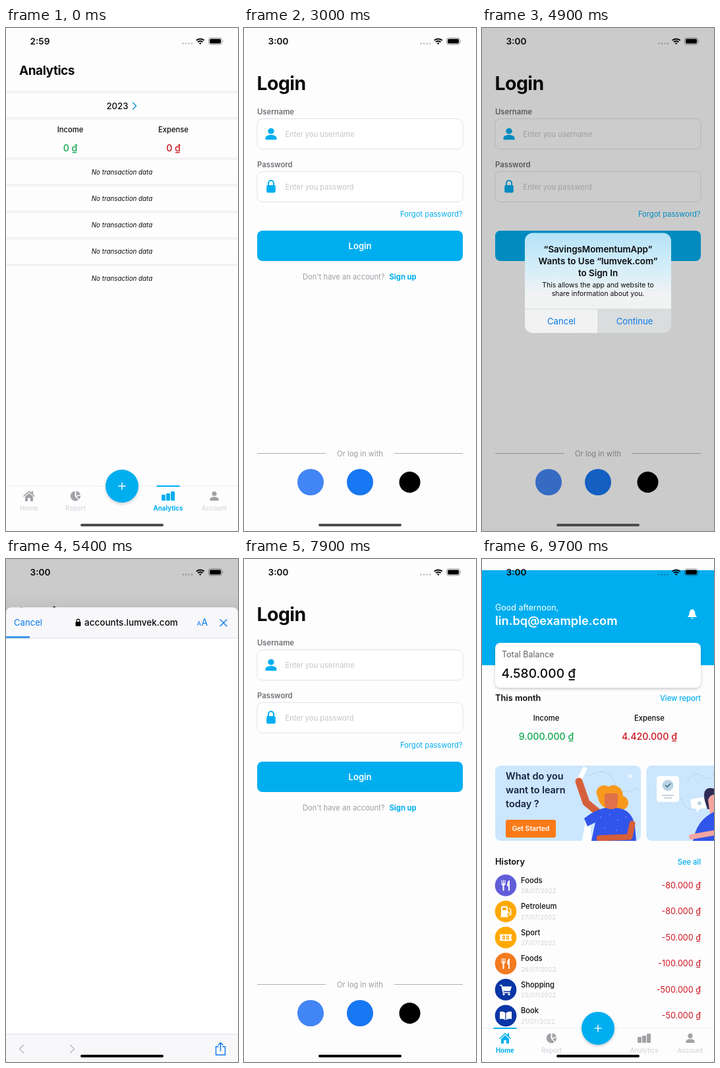
Animation, 352 px wide and 762 px high, one loop 9.8 s. Source, as an HTML page:

```html
<!DOCTYPE html>
<html lang="en">
<head>
<meta charset="utf-8">
<title>Money app login flow</title>
<style>
  :root {
    --blue: #00aeef;
    --loop: 9800ms;
    /* critically damped spring sampled over 520 ms */
    --spring: linear(0, .0525 3.85%, .166 7.7%, .429 15.4%, .643, .789, .879, .933, .963, .98, .989, .9944, .997, 1);
  }
  html, body { margin: 0; width: 100%; height: 100%; overflow: hidden; background: #fefdfe; }
  svg { display: block; width: 100vw; height: 100vh; }
  text { font-family: Inter, "Noto Sans", sans-serif; font-size: 11.2px; fill: #0b0b0d; white-space: pre; }
  .mid { text-anchor: middle; }
  .end { text-anchor: end; }
  .b { font-weight: 700; }
  .sb { font-weight: 600; }
  .m { font-weight: 500; }
  .blue { fill: var(--blue); }
  .ios { fill: #0a7aea; font-size: 13.1px; }
  .white { fill: #fff; }
  .green { fill: #12a84e; }
  .red { fill: #cb1620; }
  .grey { fill: #9d9da4; }
  .label { fill: #6f6f75; font-weight: 600; font-size: 11.3px; }
  .hint { fill: #c5c5cb; font-size: 11.1px; }
  .h1 { font-size: 19px; font-weight: 700; letter-spacing: -.45px; }
  .h2 { font-size: 12.8px; font-weight: 600; }
  .ask { font-size: 13.4px; font-weight: 600; text-anchor: middle; }
  .note { font-size: 10.4px; text-anchor: middle; }
  .sum { font-size: 14.2px; font-weight: 500; }
  .tab { font-size: 9.7px; font-weight: 500; text-anchor: middle; fill: #d5d5dc; }
  .tab.on { font-weight: 700; fill: var(--blue); }
  .none { font-size: 9.8px; font-style: italic; text-anchor: middle; }
  .date { font-size: 9.6px; fill: #d2d2d9; }
  .slogan { font-size: 14.4px; font-weight: 600; fill: #17213c; }
  .line { fill: none; stroke-linecap: round; stroke-linejoin: round; }
  .page text { font-family: Roboto, "Noto Sans", sans-serif; fill: #3c4043; font-size: 11.7px; }
  .page .foot { font-size: 9.7px; }

  .anim { animation: var(--loop) linear infinite; }
  .step { animation-timing-function: step-end; }
  .old { animation-name: old; }
  .new { animation-name: new; }
  .account { animation-name: account; }
  .login { animation-name: login; }
  .dim { animation-name: dim; }
  .alert { animation-name: alert; transform-origin: 176px 386px; }
  .press { animation-name: press; }
  .sheet { animation-name: sheet; }
  .load { animation-name: load; transform-origin: 0 0; }
  .page { animation-name: page; }
  .tap { animation-name: tap; }
  .busy { animation-name: busy; }
  .seek { animation-name: seek; }
  .stop { animation-name: stop; }
  .reload { animation-name: reload; }
  .back { animation-name: back; }
  .home { animation-name: home; }
  .bar { animation-name: bar; }

  @keyframes old { 0% { opacity: 1 } 30.56%, 100% { opacity: 0 } }
  @keyframes new { 0% { opacity: 0 } 30.56%, 100% { opacity: 1 } }
  @keyframes account { 0% { opacity: 0 } 10.15%, 100% { opacity: 1 } }
  @keyframes login {
    0% { transform: translateY(762px) }
    22.28% { transform: translateY(762px); animation-timing-function: var(--spring) }
    27.58%, 100% { transform: none }
  }
  @keyframes dim { 0%, 39.59% { opacity: 0 } 42.35%, 75.92% { opacity: .2 } 80%, 100% { opacity: 0 } }
  @keyframes alert {
    0% { opacity: 0; transform: scale(1.18) }
    39.59% { opacity: 0; transform: scale(1.18); animation-timing-function: var(--spring) }
    44.9%, 50.51% { opacity: 1; transform: none }
    51.84%, 100% { opacity: 0; transform: none }
  }
  @keyframes press { 0% { opacity: 0 } 49.9%, 100% { opacity: 1 } }
  @keyframes sheet {
    0% { transform: translateY(735px) }
    51.07% { transform: translateY(735px); animation-timing-function: var(--spring) }
    56.38% { transform: none }
    75.92% { transform: none; animation-timing-function: var(--spring) }
    81.22%, 100% { transform: translateY(735px) }
  }
  @keyframes load {
    0%, 60.1% { transform: scaleX(.102); opacity: 1 }
    65.31% { transform: none; opacity: 1 }
    66.12%, 72.34% { transform: none; opacity: 0 }
    72.35%, 100% { transform: scaleX(.102); opacity: 1 }
  }
  @keyframes page {
    0%, 63.15% { opacity: 0 }
    63.16%, 71.43% { opacity: 1 }
    72.96%, 100% { opacity: .5 }
  }
  @keyframes tap { 0% { opacity: 0 } 70.31% { opacity: 1 } 72%, 100% { opacity: 0 } }
  @keyframes busy { 0% { opacity: 0 } 71.33%, 100% { opacity: 1 } }
  @keyframes seek {
    0%, 71.33% { transform: translateX(-214px) }
    75.51% { transform: translateX(37px) }
    81.22%, 100% { transform: translateX(352px) }
  }
  @keyframes stop { 0% { opacity: 1 } 65.2% { opacity: 0 } 72.35%, 100% { opacity: 1 } }
  @keyframes reload { 0% { opacity: 0 } 65.2% { opacity: 1 } 72.35%, 100% { opacity: 0 } }
  @keyframes back { 0% { stroke: #b9b9be } 72.35%, 100% { stroke: #0a7aea } }
  @keyframes home {
    0% { transform: translateY(762px) }
    94.72% { transform: translateY(762px); animation-timing-function: var(--spring) }
    100% { transform: none }
  }
  @keyframes bar { 0% { fill: #4c4c4f } 52%, 100% { fill: #000 } }
</style>
</head>
<body>
<svg viewBox="0 0 352 762">
  <defs>
    <linearGradient id="frost" x2="0" y2="1">
      <stop offset="0" stop-color="#b5e2f7"/><stop offset=".3" stop-color="#cfecf9"/>
      <stop offset=".62" stop-color="#f1f3f4"/><stop offset="1" stop-color="#f1f1f1"/>
    </linearGradient>
    <linearGradient id="shade" x2="0" y2="1">
      <stop offset="0" stop-opacity="0"/><stop offset="1" stop-opacity=".09"/>
    </linearGradient>
    <filter id="soft" x="-20%" y="-20%" width="140%" height="150%">
      <feDropShadow dx="0" dy="2" stdDeviation="2" flood-opacity=".2"/>
    </filter>
    <clipPath id="alertBox"><rect x="65" y="310.5" width="222" height="151.5" rx="12"/></clipPath>
    <clipPath id="card1"><rect x="20" y="296" width="221" height="114" rx="8"/></clipPath>
    <clipPath id="card2"><rect x="249.5" y="296" width="221" height="114" rx="8"/></clipPath>

    <path id="houseIcon" d="M-9 0 0-8 3.5-5V-7.5H6V-2.7L9 0 8 1.2 0-5.8-8 1.2zM-6 1 0-4.3 6 1V8H2V3H-2V8H-6z"/>
    <path id="pieIcon" d="M-1-7.5A7.5 7.5 0 1 0 4.5 5.8L-1 .5zM1-7.5A7.5 7.5 0 0 1 7.3-2.5L1-.5zM1.5 1 7.5-1A7.5 7.5 0 0 1 5.8 5z"/>
    <g id="barsIcon"><rect x="-10" y="-2" width="6" height="9" rx="1.3"/><rect x="-3" y="-4" width="6" height="11" rx="1.3"/><rect x="4" y="-7" width="6" height="14" rx="1.3"/></g>
    <g id="personIcon"><circle cy="-3.5" r="3.6"/><path d="M-6.5 7V5C-6.5 0 6.5 0 6.5 5V7z"/></g>

    <path id="forkIcon" d="M-6.5-8V-3Q-6.5 0-4.5 0V8H-2.5V0Q-.5 0-.5-3V-8H-1.6V-3H-2.9V-8H-4.1V-3H-5.4V-8zM6-8Q2-7 2 1H4V8H6z"/>
    <path id="pumpIcon" fill-rule="evenodd" d="M-7-6Q-7-8-5-8H1Q3-8 3-6V0Q6 0 6 3V4Q7 5 7 3V-2L4.5-4.5 5.5-5.5 8.5-2.5V4Q8 7 5 5.5V3Q5 1.5 3 1.5V7H4V8.5H-8V7H-7zM-5-6V-2H1V-6z"/>
    <path id="ticketIcon" fill-rule="evenodd" d="M-9-5H9V-1.5Q7 0 9 1.5V5H-9V1.5Q-7 0-9-1.5zM-5-3V3H-1V-3zM1-3V3H5V-3zM-4-1H-2V1H-4zM2-1H4V1H2z"/>
    <g id="cartIcon"><path d="M-9-7.5H-5.5L-5-5H9L7 2H-3.6L-3.3 3.5H6.5V5H-4.6L-6.8-6H-9z"/><circle cx="-3" cy="7" r="1.6"/><circle cx="5" cy="7" r="1.6"/></g>
    <path id="bookIcon" d="M-.6-4.5Q-4-7-9-6V5Q-4 4-.6 6.5zM.6-4.5Q4-7 9-6V5Q4 4 .6 6.5z"/>
    <g id="lockIcon"><rect x="-6.8" y="-2" width="13.6" height="11.5" rx="2"/><path class="line" stroke="currentColor" stroke-width="2" d="M-4-2V-5A4 4 0 0 1 4-5V-2"/></g>
  </defs>

  <g id="analytics">
    <rect width="352" height="762" fill="#fefdfe"/>
    <text class="h1" x="20" y="71">Analytics</text>
    <g id="bands" fill="#f3f3f6"></g>
    <text class="mid m" x="169" y="122.7" style="font-size:13.2px">2023</text>
    <path class="line" d="M192.5 113 197.5 118 192.5 123" stroke="#1597d4" stroke-width="1.5"/>
    <path d="M176 143V195" stroke="#f6f6f8"/>
    <g id="totals"></g>
  </g>

  <g class="anim step account">
    <rect width="352" height="762" fill="#fefdfe"/>
    <text class="h1" x="20" y="71">Account</text>
    <rect y="95" width="352" height="4" fill="#f3f3f6"/>
    <g id="accountTabs"></g>
  </g>

  <g class="anim login">
    <rect width="352" height="762" fill="#fefdfe"/>
    <text class="b" x="19.5" y="94" style="font-size:28.5px;letter-spacing:-.6px">Login</text>
    <text class="label" x="20" y="131">Username</text>
    <text class="label" x="20" y="211">Password</text>
    <g fill="#fff" stroke="#e1e0e8"><rect x="20" y="137.5" width="312" height="46" rx="8"/><rect x="20" y="217.5" width="312" height="46" rx="8"/></g>
    <use href="#personIcon" class="blue" transform="translate(41 160.5) scale(1.3 1.25)"/>
    <use href="#lockIcon" class="blue" color="#00aeef" x="41" y="240"/>
    <text class="hint" x="62.5" y="164.5">Enter you username</text>
    <text class="hint" x="62.5" y="244.5">Enter you password</text>
    <text class="blue end" x="331.5" y="286">Forgot password?</text>
    <rect class="blue" x="20" y="307" width="312" height="46" rx="8"/>
    <text class="white sb mid" x="176" y="334.7" style="font-size:13px">Login</text>
    <text class="grey" x="89" y="380.5">Don't have an account?</text>
    <text class="blue b" x="220.5" y="380.5">Sign up</text>
    <path d="M20 644.5H124M228 644.5H332" stroke="#aeaeb2"/>
    <text class="grey mid" x="176" y="648.5">Or log in with</text>
    <circle cx="101" cy="688" r="20" fill="#4285f4"/>
    <circle cx="176" cy="688" r="20" fill="#1877f2"/>
    <circle cx="251.5" cy="688" r="16"/>
  </g>

  <rect class="anim dim" width="352" height="762"/>

  <g class="anim alert">
    <g clip-path="url(#alertBox)">
      <rect x="65" y="310" width="222" height="152" fill="url(#frost)"/>
      <rect class="anim step press" x="176" y="426" width="111" height="36" fill="#dadddd"/>
      <path d="M65 426H287M176 426V462" stroke="#c9cccd" stroke-width=".7"/>
    </g>
    <text class="ask" x="176" y="340">“SavingsMomentumApp”</text>
    <text class="ask" x="176" y="358">Wants to Use “lumvek.com”</text>
    <text class="ask" x="176" y="376">to Sign In</text>
    <text class="note" x="176" y="392.7">This allows the app and website to</text>
    <text class="note" x="176" y="406">share information about you.</text>
    <text class="ios mid" x="120.5" y="449">Cancel</text>
    <text class="ios mid" x="231.5" y="449">Continue</text>
  </g>

  <g class="anim sheet">
    <rect y="27" width="352" height="40" fill="url(#shade)"/>
    <path d="M0 762V56Q0 47 9 47H343Q352 47 352 56V762z" fill="#f8f7fa"/>
    <rect y="93.5" width="352" height="600" fill="#fefefe"/>
    <path d="M0 93.5H352M0 693.5H352" stroke="#dedde1"/>
    <text class="ios" x="12" y="75">Cancel</text>
    <use href="#lockIcon" color="#000" transform="translate(109.5 70) scale(.58)"/>
    <text class="m" x="119" y="75" style="font-size:13.5px">accounts.lumvek.com</text>
    <text class="ios" x="289.5" y="75" style="font-size:9.5px">A</text>
    <text class="ios" x="296.5" y="75" style="font-size:14px">A</text>
    <g class="line" stroke="#0a7aea" stroke-width="1.4">
      <path class="anim step stop" d="M325 65.5 335 75.5M335 65.5 325 75.5"/>
      <path class="anim step reload" d="M334.5 68A5.8 5.8 0 1 0 335.5 71.5M334.8 63.5V68.2H330"/>
      <path class="anim step back" d="M26.5 710 20.5 716 26.5 722"/>
      <path d="M97.5 710 103.5 716 97.5 722" stroke="#b9b9be"/>
      <path d="M322 712.5H318.5V725H332.5V712.5H329M325.5 719V706.5M322 710 325.5 706.5 329 710"/>
    </g>
    <g class="anim page">
      <circle cx="19" cy="109" r="5.5" fill="#4285f4"/>
      <text x="34.5" y="112.7">Đăng nhập bằng Lumvek</text>
      <path d="M0 122.5H352M20 260.5H332M20 301.5H332" stroke="#d5d7da"/>
      <rect class="anim step tap" x="20" y="219" width="312" height="41" fill="#ececee"/>
      <text class="mid" x="176" y="164.5" style="font-size:20px">Chọn tài khoản</text>
      <text x="60" y="191.7" style="font-size:13px">để tiếp tục tới</text>
      <text class="m" x="146" y="191.7" style="font-size:13.5px;fill:#1a73e8">SavingsMomentumApp</text>
      <circle cx="31" cy="238" r="10" fill="#3f9dc0"/>
      <text x="52.5" y="242.5" style="font-size:10.8px">lin.bq@example.com</text>
      <g class="line" stroke="#3c4043" stroke-width="1.2"><circle cx="31" cy="281" r="6.5"/><circle cx="31" cy="279" r="2.2"/><path d="M26.5 285.5Q31 281.5 35.5 285.5"/></g>
      <text class="m" x="52.5" y="285" style="font-size:12.3px">Sử dụng một tài khoản khác</text>
      <text x="20" y="348">Để tiếp tục, Lumvek sẽ chia sẻ tên, địa chỉ email, tùy chọn</text>
      <text x="20" y="365.5">ngôn ngữ và ảnh hồ sơ của bạn với</text>
      <text x="20" y="383">SavingsMomentumApp.</text>
      <text class="foot" x="20" y="648">Tiếng Việt</text>
      <path d="M70.5 643H77L73.7 646.5z" fill="#3c4043"/>
      <text class="foot" x="157" y="648">Trợ giúp</text>
      <text class="foot" x="219.5" y="648">Bảo mật</text>
      <text class="foot end" x="332" y="648">Điều khoản</text>
    </g>
    <g class="anim step busy">
      <rect y="93" width="352" height="3" fill="#dcdde0"/>
      <rect class="anim seek" y="93" width="214" height="3" fill="#1a73e8"/>
    </g>
    <rect class="anim load" y="91" width="352" height="2.3" fill="#0a7aea"/>
  </g>

  <g class="anim home">
    <rect width="352" height="762" fill="#fefdfe"/>
    <rect class="blue" width="352" height="144"/>
    <text class="white" x="20" y="61" style="font-size:12.5px">Good afternoon,</text>
    <text class="white sb" x="20" y="83" style="font-size:18.2px">lin.bq@example.com</text>
    <path class="white" d="M319 59C314 60 315 66 314 68L312 71H326L324 68C323 66 324 60 319 59zM317 72H321Q319 75 317 72z"/>
    <rect x="20" y="110" width="312" height="68" rx="8" class="white" filter="url(#soft)"/>
    <text x="30" y="132.5" style="font-size:12.5px;fill:#606066">Total Balance</text>
    <text class="m" x="29.5" y="163" style="font-size:19.2px">4.580.000 ₫</text>
    <text class="h2" x="20" y="198.5">This month</text>
    <text class="blue m end" x="332" y="198.5">View report</text>
    <g id="month"></g>

    <g clip-path="url(#card1)">
      <rect x="20" y="296" width="222" height="114" fill="#cbe6fd"/>
      <path class="line" d="M160 312Q190 296 200 320T236 330" stroke="#9fb9dc" stroke-width=".7" stroke-dasharray="2 2"/>
      <path d="M152 410 158 372 164 374 166 410zM141 322 154 297 160 300 148 326z" fill="#fff"/>
      <path class="line" d="M147 320 158 352 180 370" stroke="#d65f3a" stroke-width="11"/>
      <path d="M176 344C168 332 182 322 192 328 202 322 214 330 214 342 226 346 224 362 212 363 202 368 178 362 176 344z" fill="#f7991d"/>
      <path d="M155 376Q180 356 204 360 228 362 232 388L234 410H166L172 382 160 388z" fill="#3155ea"/>
      <path d="M186 338H206V352Q206 362 196 362T186 352z" fill="#e0714a"/>
      <path d="M184 342Q192 332 208 340L208 332 186 330z" fill="#f7991d"/>
      <path class="line" d="M228 384 224 404 178 406" stroke="#d65f3a" stroke-width="9"/>
      <g fill="#6f8bfa"><circle cx="180" cy="374" r="1"/><circle cx="194" cy="370" r="1"/><circle cx="206" cy="378" r="1"/><circle cx="186" cy="390" r="1"/><circle cx="204" cy="394" r="1"/><circle cx="218" cy="374" r="1"/></g>
      <circle cx="225" cy="312" r="3" fill="#eaf5ff"/>
    </g>
    <g id="slogan"></g>
    <rect x="36" y="378" width="76" height="27" rx="3" fill="#fb7a17"/>
    <text class="white sb mid" x="74" y="395.5" style="font-size:10.4px">Get Started</text>

    <g clip-path="url(#card2)">
      <rect x="249" y="296" width="110" height="114" fill="#cbe6fd"/>
      <path class="line" d="M312 322Q318 302 334 312T352 306M302 346Q306 362 318 362" stroke="#9fb9dc" stroke-width=".7" stroke-dasharray="2 2"/>
      <rect x="265" y="312" width="34" height="39" rx="4" fill="#fff"/>
      <circle cx="282" cy="326" r="8.5" fill="#b9d4e4"/>
      <path class="line" d="M278.5 326 281 328.5 286 323.5" stroke="#44708c" stroke-width="1.5"/>
      <path d="M273 341H291M276 345H288" stroke="#b8c6d2" stroke-width="1.5"/>
      <path d="M316 347 341 343 343 360 331 361 326 367 325 361 318 361z" fill="#fff"/>
      <circle cx="330" cy="353" r="3" fill="#b9d4e4"/>
      <path d="M338 349C334 332 342 328 352 331V362H342z" fill="#2d2c57"/>
      <path d="M343 348Q346 340 352 340V370H346z" fill="#f3a6a0"/>
      <path d="M320 410Q326 378 352 366V410z" fill="#3155ea"/>
      <path class="line" d="M318 404 352 398" stroke="#f3a6a0" stroke-width="8"/>
    </g>

    <text class="h2" x="20" y="446">History</text>
    <text class="blue m end" x="332" y="446">See all</text>
    <g id="history"></g>
    <g id="homeTabs"></g>
  </g>

  <g id="status">
    <text class="sb anim step old" x="36.5" y="25" style="font-size:13.6px">2:59</text>
    <text class="sb anim step new" x="36.5" y="25" style="font-size:13.6px">3:00</text>
    <g fill-opacity=".2"><circle cx="268.5" cy="23.5" r="1.5"/><circle cx="273" cy="23.5" r="1.5"/><circle cx="277.5" cy="23.5" r="1.5"/><circle cx="282" cy="23.5" r="1.5"/></g>
    <path d="M288.7 18.7A9 9 0 0 1 300.7 18.7M291 21.3A5.5 5.5 0 0 1 298.4 21.3" fill="none" stroke="#000" stroke-width="2"/>
    <path d="M292.8 23Q294.7 21.5 296.6 23L294.7 25z"/>
    <rect x="307.5" y="15" width="20" height="10" rx="3" fill="none" stroke="#000" stroke-opacity=".4"/>
    <rect x="309" y="16.5" width="17" height="7" rx="1.7"/>
    <path d="M328.8 18.3Q330.5 20 328.8 21.7z" opacity=".45"/>
  </g>
  <rect class="anim bar" x="113" y="751" width="126" height="4" rx="2" style="animation-timing-function:step-end"/>
</svg>

<script>
  const fill = (id, html) => { document.getElementById(id).innerHTML += html; };
  const text = (x, y, str, cls) => `<text x="${x}" y="${y}" class="${cls}">${str}</text>`;

  const tabs = [[35, "Home", "house"], [105.5, "Report", "pie"], [246, "Analytics", "bars"], [316, "Account", "person"]];

  function tabBar(active) {
    const items = tabs.map(([x, name, icon]) => {
      const on = name === active;
      return `<use href="#${icon}Icon" x="${x}" y="709" fill="${on ? "#00aeef" : "#a1a1a6"}"/>` +
        text(x, 731, name, on ? "tab on" : "tab") +
        (on ? `<rect class="blue" x="${x - 17.5}" y="693" width="35" height="2"/>` : "");
    });
    return `<rect y="694" width="352" height="68" fill="#fefdfe"/>
      <path d="M0 694H352" stroke="#eeeef1"/>${items.join("")}
      <circle class="blue" cx="176" cy="694" r="25" filter="url(#soft)"/>
      <path d="M170.5 694H181.5M176 688.5V699.5" stroke="#fff" stroke-width="1.4"/>`;
  }

  const totals = (y, income, expense) =>
    text(97.5, y, "Income", "mid m") + text(254, y, "Expense", "mid m") +
    text(97.5, y + 29, income + " ₫", "mid sum green") + text(254, y + 29, expense + " ₫", "mid sum red");

  fill("bands", [95, 135, 196, 236, 276.4, 316.7, 357].map(y => `<rect y="${y}" width="352" height="4"/>`).join(""));
  fill("totals", totals(158, "0", "0"));
  for (let i = 0; i < 5; i++) fill("analytics", text(176, 221.5 + i * 40.3, "No transaction data", "none"));
  fill("analytics", tabBar("Analytics"));
  fill("accountTabs", tabBar("Account"));

  fill("month", totals(228.5, "9.000.000", "4.420.000"));
  ["What do you", "want to learn", "today ?"].forEach((str, i) =>
    fill("slogan", text(36, 317 + i * 21.3, str, "slogan")));

  const history = [
    ["Foods", "28", "80", "fork", "#605dd8"],
    ["Petroleum", "27", "80", "pump", "#ffa900"],
    ["Sport", "27", "50", "ticket", "#ffa900"],
    ["Foods", "26", "100", "fork", "#f37a20"],
    ["Shopping", "25", "500", "cart", "#0a35a6"],
    ["Book", "21", "50", "book", "#0a35a6"]
  ];
  history.forEach(([name, day, sum, icon, color], i) => {
    const y = 477.5 + i * 39.5;
    fill("history", `<circle cx="36" cy="${y}" r="16.3" fill="${color}"/>
      <use href="#${icon}Icon" class="white" x="36" y="${y}"/>` +
      text(59, y - 3.7, name, "m") +
      text(59, y + 12, day + "/07/2022", "date") +
      text(332, y + 4.5, `-${sum}.000 ₫`, "end red h3"));
  });
  fill("homeTabs", tabBar("Home"));
</script>
<style>.h3 { font-size: 12.6px; }</style>
</body>
</html>
```
